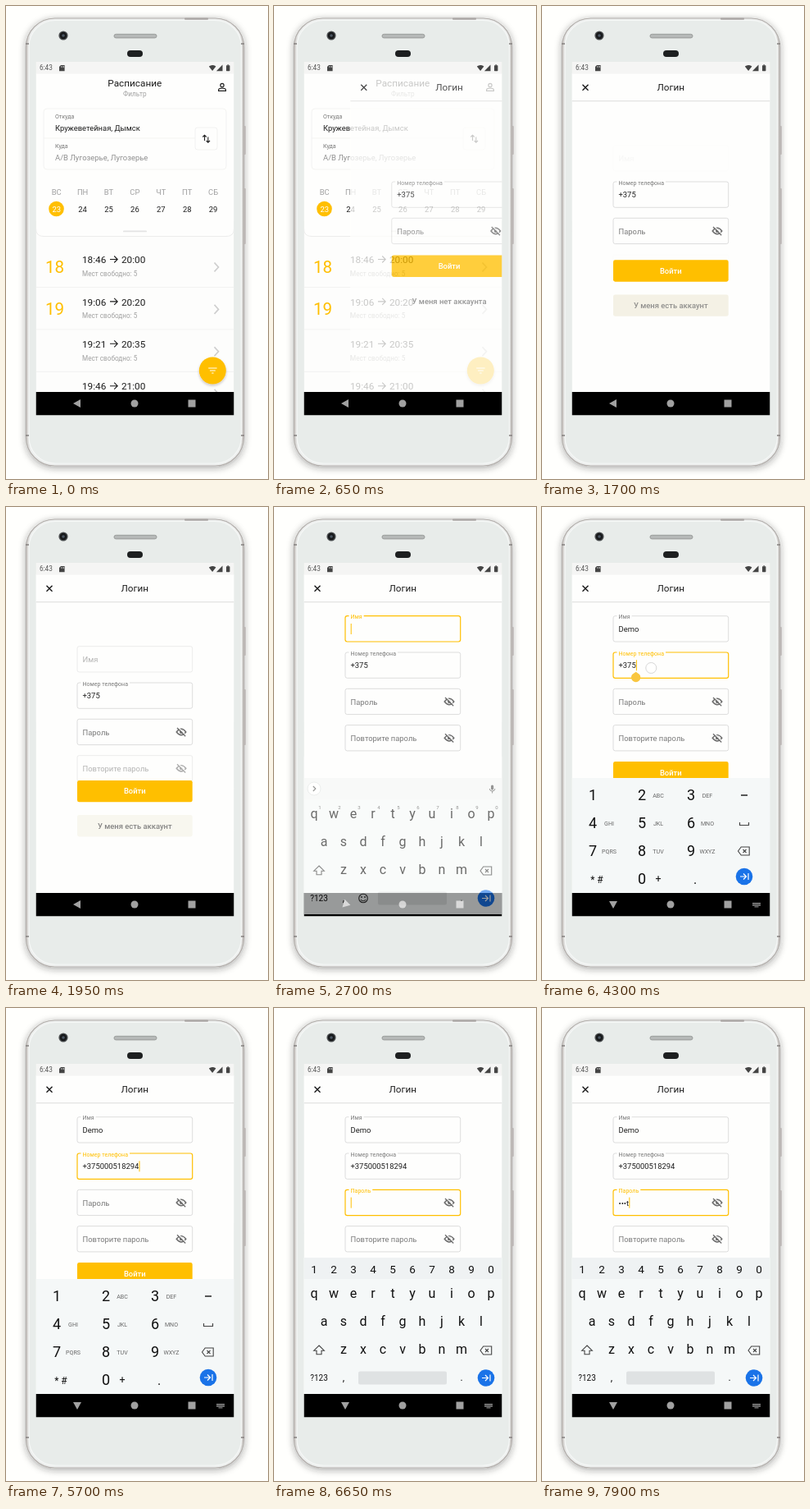
These frames come from a looping animation (320 px wide and 576 px high, 8000 ms). An HTML page:

```html
<!DOCTYPE html>
<html lang="ru">
<head>
<meta charset="utf-8">
<title>Расписание</title>
<style>
html, body { margin: 0; width: 100%; height: 100%; overflow: hidden; background: #fffffd; }
svg { display: block; width: 100%; height: 100%; font-family: Roboto, "Noto Sans", sans-serif; }
text { white-space: pre; }
</style>
</head>
<body>
<svg id="stage" viewBox="0 0 320 576"></svg>
<script>
const LOOP = 8000, AMBER = '#ffbf00', INK = '#1c1c1c', PAPER = '#fefefd';
const BODY = 9.42, SMALL = 7.07;

// ---- drawing helpers ----
const text = (x, y, size, str, fill = INK, more = '') =>
  `<text x="${x}" y="${y + size * 0.355}" font-size="${size}" fill="${fill}" ${more}>${str}</text>`;
const mid = (x, y, size, str, fill, more = '') => text(x, y, size, str, fill, 'text-anchor="middle" ' + more);
const rect = (x, y, w, h, fill, more = '') =>
  `<rect x="${x}" y="${y}" width="${w}" height="${h}" fill="${fill}" ${more}/>`;
const circle = (x, y, r, fill, more = '') => `<circle cx="${x}" cy="${y}" r="${r}" fill="${fill}" ${more}/>`;
const line = (d, stroke, width = 1, more = '') =>
  `<path d="${d}" fill="none" stroke="${stroke}" stroke-width="${width}" ${more}/>`;
const group = (id, inner, more = '') => `<g id="${id}" ${more}>${inner}</g>`;
const at = (x, y, inner) => `<g transform="translate(${x} ${y})">${inner}</g>`;

// ---- phone ----
const device = () =>
  rect(24, 14.5, 267, 546, '#dce1df', 'rx="35" filter="url(#soft)"') +
  rect(290, 146, 3, 35, '#c3bfbd', 'rx="1"') + rect(290, 222, 3, 68, '#c3bfbd', 'rx="1"') +
  rect(24.5, 15, 266, 545, 'url(#metal)', 'rx="35" stroke="#b3aeab" stroke-width="1.2"') +
  rect(28, 17.5, 259.5, 539.5, '#e8ecea', 'rx="32" stroke="#f6f8f7" stroke-width="1.2"') +
  rect(218, 14.5, 29, 2.2, '#aaa6a4', 'rx="1"') +
  line('M24 46h4M287 46h4M24 523h4M287 523h4', '#858180', 1.6) +
  circle(70, 36, 5.6, '#4b4e50') + circle(70, 36, 4.2, '#17191b') + circle(70, 36, 1.8, '#4a5561') +
  rect(132, 34.3, 52, 4.6, '#b6b9b8', 'rx="2.300" stroke="#8d908f" stroke-width=".8"') +
  rect(148, 54, 19, 8, '#1d1f20', 'rx="4"');

const statusBar = () =>
  rect(36.5, 68, 242, 14.5, '#f5f5f4') + text(41, 75.5, 8.2, '6:43', '#555') +
  '<path d="M67 72h4.600v7.200h-6.600v-5.200z" fill="#444"/>' + line('M67.600 73v2M69.100 73v2M70.500 73v2', '#ddd', 0.6) +
  '<path d="M247.800 73.600q4.300-3.200 8.600 0l-4.300 5.500z" fill="#444"/>' +
  '<path d="M264.500 71.600v7.600h-7.600z" fill="#444"/>' +
  rect(269, 72.2, 4.4, 7, '#444', 'rx=".6"') + rect(270.3, 71.4, 1.8, 1, '#444');

// ---- timetable page ----
const trip = (i, from, to) => {
  const y = 318 + 51.4 * i;
  return text(93, y - 9, 11.78, from) +
    line(`M127 ${y - 9.5}h9M132.2 ${y - 13.5}l4 4-4 4`, INK, 1.1) +
    text(141, y - 9, 11.78, to) + text(93, y + 8, 8.2, 'Мест свободно: 5', '#a2a2a2') +
    line(`M254.5 ${y - 5.5}l5 5.5-5 5.5`, '#cfcfcf', 1.7) +
    line(`M36.5 ${y + 24.5}h242`, '#eeeeed', 0.7);
};

const schedule = () => {
  const days = ['ВС', 'ПН', 'ВТ', 'СР', 'ЧТ', 'ПТ', 'СБ'];
  const trips = [['18:46', '20:00'], ['19:06', '20:20'], ['19:21', '20:35'], ['19:46', '21:00']];
  return rect(36.5, 82, 242, 388, '#fdfdfc') +
    trips.map((p, i) => trip(i, ...p)).join('') +
    text(48, 318, 20.6, '18', AMBER) + text(48, 369, 20.6, '19', AMBER) +
    '<path d="M36.5 82h242v189q0 9.500-9.500 9.500h-223q-9.500 0-9.500-9.500z" fill="#fefefd" stroke="#e9e9e8" stroke-width=".8"/>' +
    rect(36.5, 82, 242, 180, PAPER) +
    mid(157.3, 94, 11.78, 'Расписание') + mid(157.3, 107, 8.2, 'Фильтр', '#a2a2a2') +
    circle(264, 96.5, 2.1, 'none', 'stroke="#222" stroke-width="1.2"') +
    line('M259.600 103.400v-1.200q0-2 4.400-2t4.400 2v1.200z', '#222', 1.2) +
    rect(46, 125, 223, 74, PAPER, 'rx="4" stroke="#f0f0ef" stroke-width=".8"') +
    line('M46 161h185', '#eeeeed', 0.7) +
    text(60, 134, SMALL, 'Откуда', '#777') + text(60, 148.5, BODY, 'Кружеветейная, Дымск') +
    text(60, 170.5, SMALL, 'Куда', '#777') + text(60, 185, BODY, 'А/В Лугозерье, Лугозерье', '#8f8f8f') +
    rect(231, 148, 27, 27, PAPER, 'rx="3" stroke="#efefee" stroke-width=".8"') +
    line('M242.500 164v-6.500M240.300 159.500l2.200-2.200 2.200 2.200M246.800 159.500v6.500M244.600 164l2.200 2.200 2.200-2.200', '#222', 1.1) +
    circle(61.5, 247, 9.3, AMBER) +
    days.map((d, i) => mid(61.7 + 31.9 * i, 227, BODY, d, '#a0a0a0') +
      mid(61.7 + 31.9 * i, 247.2, BODY, 23 + i, i ? INK : '#fff')).join('') +
    rect(143, 273.5, 29, 1.8, '#e4e4e3', 'rx=".9"') +
    circle(252.3, 444, 16.5, AMBER, 'filter="url(#lift)"') +
    line('M247.200 441h10.400M249 444h6.800M251.200 447h2.400', '#fff', 1.2);
};

// ---- login page ----
const eye = () => at(214, 15.7,
  line('M-5.800 0Q0-7.400 5.800 0Q0 7.400-5.800 0z', '#6d6d6d', 1.4) + circle(0, 0, 2, '#6d6d6d') +
  line('M-4-5.800l10 10', PAPER, 1.2) + line('M-5-5l10.200 10.200', '#6d6d6d', 1.3));

const field = (id, label, hasEye) => group(id,
  rect(87, 0, 140.7, 31.3, PAPER, 'class="box" rx="2.400"') +
  rect(91.5, -2, 0, 5, PAPER, 'class="gap"') +
  `<text class="label" x="93.5">${label}</text>` +
  text(93.5, 16, BODY, '', INK, 'class="value"') +
  (hasEye ? eye() : '') + rect(0, 9.3, 1, 13, AMBER, 'class="caret"'));

const login = () =>
  rect(36.5, 82, 242, 388, PAPER) +
  group('form',
    field('name', 'Имя') + field('phone', 'Номер телефона') +
    field('pass', 'Пароль', true) + field('again', 'Повторите пароль', true) +
    group('actions',
      rect(87, 0, 140.7, 26.4, AMBER, 'rx="2.400"') +
      mid(157.3, 13.2, BODY, 'Войти', '#fff', 'font-weight="500"') +
      rect(87, 42.2, 140.7, 26.4, '#d0c48c', 'id="press" rx="2.400"') +
      mid(157.3, 55.7, BODY, '', '#777', 'id="toggle" font-weight="500"')) +
    group('handle', '<path d="M114.700 200.800l4.200 3a5.700 5.700 0 1 1-8.800.3z" fill="#f9c63f"/>') +
    circle(133.3, 233, 6.5, '#fff', 'id="touch" fill-opacity=".8" stroke="#d2d2d2" stroke-width=".9"')) +
  rect(36.5, 82, 242, 33, PAPER) +
  rect(36.5, 115, 242, 1, '#000', 'opacity=".1"') + rect(36.5, 116, 242, 1, '#000', 'opacity=".03"') +
  line('M49.500 95.700l7 7M56.500 95.700l-7 7', '#111', 1.3) + mid(157.3, 99.3, 11.78, 'Логин');

// ---- keyboards ----
const KEYS = '#f5f8f8', KEY_INK = '#111';
const nextKey = (x, y) => circle(x, y, 10.3, '#1a73e8') +
  line(`M${x - 5} ${y}h7.5M${x - 1} ${y - 3.5}l3.5 3.5-3.5 3.5M${x + 5} ${y - 4}v8`, '#fff', 1.2);
const erase = (x, y) => line(`M${x - 7} ${y}l3.7-5h10v10h-10zM${x - 1} ${y - 2}l4 4m0-4l-4 4`, '#444', 1.1);
const keyRow = (letters, x, y) =>
  [...letters].map((c, i) => mid(x + 24 * i, y - 0.8, 16, c, KEY_INK)).join('');
const letterKeys = spaceX =>
  rect(36.5, 330, 242, 140, KEYS) +
  keyRow('qwertyuiop', 49, 348) + keyRow('asdfghjkl', 61, 382) + keyRow('zxcvbnm', 85, 416.5) +
  line('M55 411l6.300 6.200h-3.300v4.600h-6v-4.600h-3.300z', '#444', 1.1) + erase(259, 417) +
  mid(55, 450.5, 10, '?123', KEY_INK) + mid(85, 450, 12, ',', KEY_INK) +
  rect(spaceX, 442.5, 211 - spaceX, 16, '#dfe2e3', 'rx="2"') + mid(229, 450, 12, '.', KEY_INK) +
  nextKey(259, 450.5);

const wordBoard = () => rect(36.5, 304, 242, 27, '#f4f6f6') + letterKeys(127) +
  [...'1234567890'].map((d, i) => mid(56 + 24 * i, 340, 6, d, '#555')).join('') +
  circle(109, 450.5, 5.3, 'none', 'stroke="#333" stroke-width="1.1"') +
  circle(107, 449, 0.9, '#333') + circle(111, 449, 0.9, '#333') +
  line('M106 452q3 3.400 6 0', '#333', 1.1) +
  circle(49, 317, 8, '#fff', 'stroke="#d5d8d9" stroke-width=".7"') + line('M47.800 314l3 3-3 3', '#555', 1.1) +
  rect(265, 312.5, 3.2, 6, '#555', 'rx="1.600"') + line('M263.300 317q0 3 3.300 3t3.300-3M266.600 320v2.500', '#555', 0.9) +
  [95, 157, 221].map((x, i) => mid(x, 317, BODY, '', '#444', `id="hint${i}"`)).join('');

const passBoard = () => rect(36.5, 304, 242, 27, '#eff2f3') + letterKeys(103) +
  [...'1234567890'].map((d, i) => mid(49 + 24 * i, 318, 13.5, d, KEY_INK)).join('');

const numberBoard = () => {
  const caps = ['', 'ABC', 'DEF', 'GHI', 'JKL', 'MNO', 'PQRS', 'TUV', 'WXYZ'];
  return rect(36.5, 330, 242, 140, KEYS) +
    caps.map((c, i) => {
      const x = 62 + 60 * (i % 3), y = 351 + 34 * Math.floor(i / 3);
      return mid(x, y, 18, i + 1, KEY_INK) + mid(x + 20, y, SMALL, c, '#666');
    }).join('') +
    line('M243 351h8', '#222', 1.3) + line('M241.500 384v3.500h11v-3.500', '#444', 1.2) + erase(246.5, 419) +
    mid(67, 453.5, 12, '* #', KEY_INK) + mid(122, 453, 18, '0', KEY_INK) + mid(142, 453, 12.5, '+', KEY_INK) +
    mid(187, 453, 16, '.', KEY_INK) + nextKey(247, 450);
};

const navIcons = () => group('nav',
  group('back', '<path d="M-5 0l9-5v10z"/>') +
  circle(157, 484, 4.5, '#fff') + rect(222.5, 479.5, 9, 9, '#fff') +
  group('imeIcon', rect(257, 482, 10, 1.3, '#fff') + rect(257, 484.2, 10, 1.3, '#fff') + rect(259.5, 486.4, 5, 1, '#fff')),
  'fill="#fff" opacity=".63"');

// ---- scene ----
const stage = document.getElementById('stage');
const shadow = (id, blur, dy, alpha) =>
  `<filter id="${id}" x="-20%" y="-20%" width="140%" height="150%"><feDropShadow dx="0" dy="${dy}" stdDeviation="${blur}" flood-color="#2a2220" flood-opacity="${alpha}"/></filter>`;
const clip = (id, h) => `<clipPath id="${id}">${rect(36.5, 68, 242, h, '#000')}</clipPath>`;
stage.innerHTML = `<defs>${shadow('soft', 4.5, 2, 0.4)}${shadow('lift', 1.8, 1.8, 0.25)}
  ${clip('screen', 430.5)}${clip('pages', 402)}
  <linearGradient id="metal"><stop stop-color="#cdc9c6"/><stop offset=".02" stop-color="#eceeed"/>
  <stop offset=".98" stop-color="#eceeed"/><stop offset="1" stop-color="#c6c2bf"/></linearGradient></defs>` +
  rect(0, 0, 320, 576, '#fffffd') + device() +
  group('glass',
    rect(36.5, 470, 242, 28.5, '#000') +
    group('all', schedule() + group('login', login()), 'clip-path="url(#pages)"') + statusBar() +
    group('floor', rect(36.5, 304, 242, 166, PAPER)) +
    group('board', group('words', wordBoard()) + group('digits', numberBoard()) + group('secret', passBoard())) +
    navIcons(), 'clip-path="url(#screen)"');

const $ = id => document.getElementById(id);
const set = (el, attrs) => { for (const k in attrs) el.setAttribute(k, attrs[k]); };
const show = (id, on) => set($(id), { visibility: on ? 'visible' : 'hidden' });
const move = (id, x, y, more = '') => set($(id), { transform: `translate(${x} ${y}) ${more}` });
const ramp = (t, a, b) => Math.min(1, Math.max(0, (t - a) / (b - a)));
const mix = (a, b, p) => a + (b - a) * p;
const stepAt = (table, t) => table.reduce((v, [time, next]) => t >= time ? next : v, 0);

// ---- timeline: [time, characters typed] ----
const NAME = 'Demo', PHONE = '+375000518294', PASS = 'next';
const nameSteps = [[3250, 1], [3450, 2], [3700, 3], [3850, 4]];
const phoneSteps = [[0, 4], [5000, 5], [5100, 6], [5150, 7], [5350, 9], [5500, 11], [5550, 12], [5700, 13]];
const passSteps = [[7250, 1], [7300, 2], [7600, 3], [7900, 4]];
const boards = [[2550, 'words'], [4250, 'digits'], [6600, 'secret']];
const focuses = [[2450, 'name'], [4200, 'phone'], [6500, 'pass']];
const blinks = [2500, 3050, 3250, 4750, 5000, 6200, 6600, 7100, 7250];

function drawField(id, y, value, float, focus, caretOn) {
  const g = $(id), part = c => g.querySelector('.' + c), on = focus === id;
  move(id, 0, y);
  set(part('box'), { stroke: on ? AMBER : '#cecece', 'stroke-width': on ? 1.2 : 0.7 });
  const size = mix(BODY, SMALL, float), label = part('label');
  set(label, { y: mix(16, 1, float) + size * 0.355, 'font-size': size, fill: on ? AMBER : '#7b7b7b' });
  set(part('gap'), { width: float ? (label.getComputedTextLength() + 4) * float : 0 });
  const val = part('value');
  val.textContent = value;
  set(part('caret'), {
    x: 93.7 + (value ? val.getComputedTextLength() : 0),
    visibility: on && caretOn ? 'visible' : 'hidden'
  });
}

function render(t) {
  const enter = ramp(t, 340, 745), grow = ramp(t, 1640, 2100), rise = ramp(t, 2550, 2850);
  const focus = stepAt(focuses, t), board = stepAt(boards, t);
  const caretOn = blinks.filter(b => t >= b).length % 2 === 1;

  move('login', 242 * (1 - enter), 0);
  set($('login'), { opacity: enter });
  move('form', 0, t >= 2550 ? -37 : 0);

  const name = NAME.slice(0, stepAt(nameSteps, t)), typed = stepAt(passSteps, t);
  const secret = typed ? '•'.repeat(typed - 1) + PASS[typed - 1] : '';
  drawField('name', 169.7, name, ramp(t, 2450, 2600), focus, caretOn);
  drawField('phone', 214, PHONE.slice(0, stepAt(phoneSteps, t)), 1, focus, caretOn);
  drawField('pass', 258.3, secret, ramp(t, 6500, 6650), focus, caretOn);
  drawField('again', 302.6, '', 0, focus, caretOn);
  for (const id of ['name', 'again']) set($(id), { opacity: grow ** 1.5 });

  move('actions', 0, 303.6 + 43.5 * grow);
  $('toggle').textContent = grow ? 'У меня есть аккаунт' : 'У меня нет аккаунта';
  const press = grow ? 1 - ramp(t, 1800, 2150) : 0;
  set($('press'), { 'fill-opacity': 0.22 * press });
  set($('toggle'), { 'fill-opacity': 1 - 0.2 * press });
  // the handle sits in form space, which is raised while typing
  move('handle', 0, 37);
  show('handle', t >= 4250 && t < 5000);
  show('touch', t >= 4150 && t < 4350);

  show('floor', board && board !== 'digits');
  for (const [, id] of boards) show(id, id === board);
  move('board', 0, 52 * (1 - rise));
  set($('board'), { opacity: Math.min(1, rise * 1.24) });
  const hints = name ? [name.toLowerCase(), name, name.toUpperCase()] : ['', '', ''];
  hints.forEach((h, i) => { $('hint' + i).textContent = h; });

  move('back', 87, 484, `rotate(${-90 * rise})`);
  show('imeIcon', rise === 1);
}

const start = performance.now();
function tick() {
  const t = (performance.now() - start) % LOOP;
  render(Math.floor(t / 50) * 50);
  requestAnimationFrame(tick);
}
tick();
</script>
</body>
</html>
```
